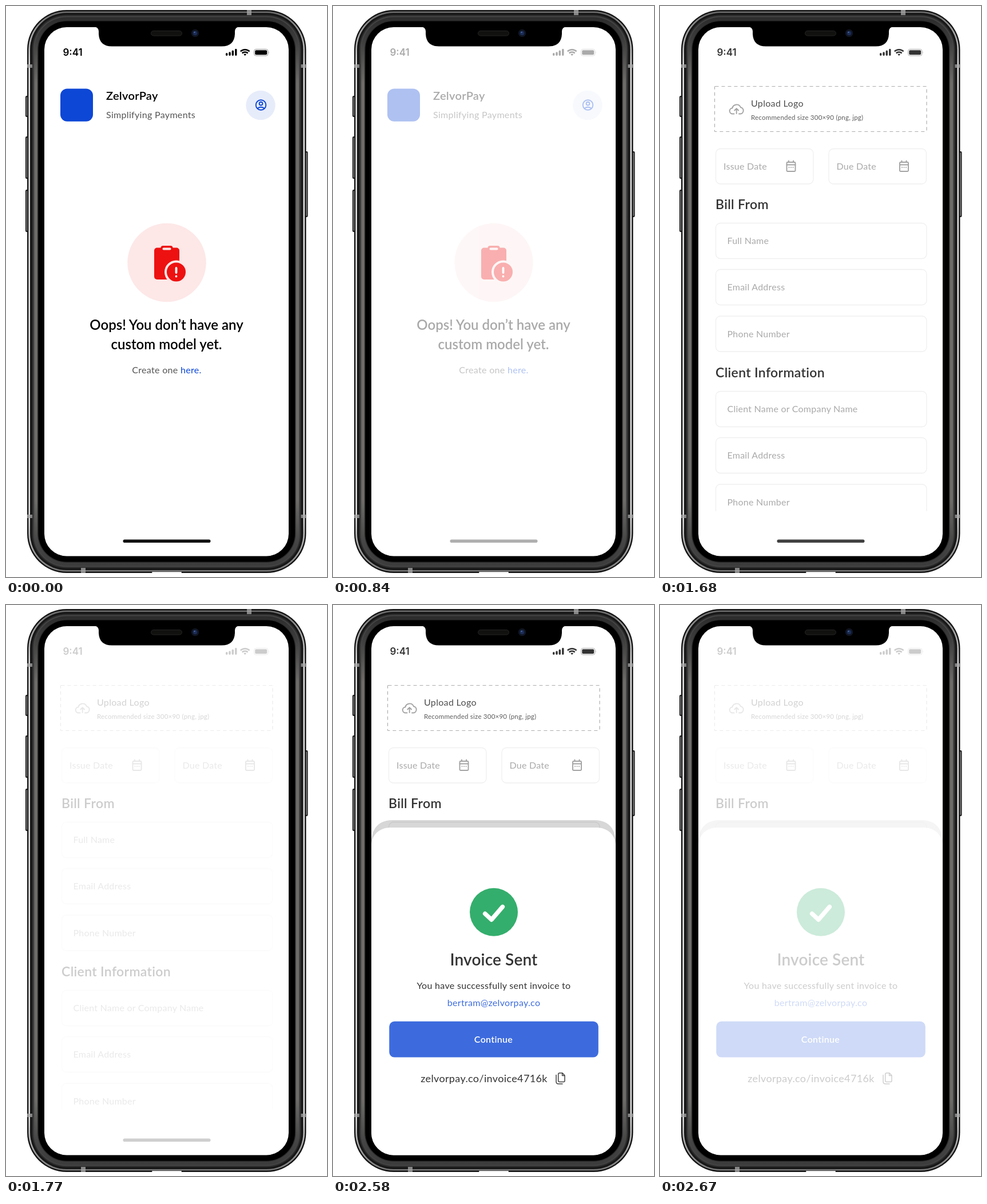
Recreate the animation shown at these times as an HTML page. Size 561 px wide and 998 px high, loop 2700 ms.

```html
<!DOCTYPE html>
<html lang="en">
<head>
<meta charset="utf-8">
<title>Invoice flow</title>
<style>
  html, body { margin: 0; width: 100%; height: 100%; overflow: hidden; background: #fff; }
  svg { display: block; width: 100vw; height: 100vh; }
  text { font: 16px Lato, sans-serif; letter-spacing: .02em; }
  .bold { font-weight: 600; letter-spacing: 0; }
  .mid { text-anchor: middle; }
  .hint { fill: #959595; letter-spacing: .015em; }
  .link { fill: #0d47d6; }
  .box { fill: none; stroke: #ebebeb; stroke-width: 1.3; }
  .icon { fill: none; stroke: #8c8c8c; stroke-width: 1.9; stroke-linecap: round; stroke-linejoin: round; }
</style>
</head>
<body>
<svg viewBox="0 0 561 998">
  <defs>
    <linearGradient id="steel" x2="0" y2="1">
      <stop offset="0" stop-color="#2c2c2c"/>
      <stop offset=".04" stop-color="#3c3c3c"/>
      <stop offset=".12" stop-color="#6d6c69"/>
      <stop offset=".88" stop-color="#6d6c69"/>
      <stop offset=".96" stop-color="#444"/>
      <stop offset="1" stop-color="#3c3c3c"/>
    </linearGradient>
    <linearGradient id="silver" x2="0" y2="1">
      <stop offset="0" stop-color="#6a6a6a"/>
      <stop offset=".03" stop-color="#999"/>
      <stop offset=".1" stop-color="#e4e4e4"/>
      <stop offset=".9" stop-color="#e4e4e4"/>
      <stop offset=".97" stop-color="#999"/>
      <stop offset="1" stop-color="#777"/>
    </linearGradient>
    <clipPath id="glass"><rect x="67" y="37" width="427" height="924.5" rx="39"/></clipPath>
    <clipPath id="scroll"><rect x="67" y="100" width="428" height="783"/></clipPath>
    <g id="calendar" class="icon">
      <rect x="1" y="3" width="15" height="16" rx="1.5"/>
      <path d="M1 7.5H16M4.5 .5V3M12.5 .5V3"/>
      <path d="M5 12h.1M8.5 12h.1M12 12h.1"/>
    </g>
    <g id="status">
      <text x="99.5" y="87" style="font:600 17px Inter, sans-serif; letter-spacing:0">9:41</text>
      <path d="M385.7 83.8v1.4M391 82v3.2M396.3 79.2v6M401.8 76.5v8.7" stroke="#000" stroke-width="3.4" stroke-linecap="round"/>
      <g fill="none" stroke="#000" stroke-width="2.5">
        <path d="M409.8 79.4a11.4 11.4 0 0 1 15.8 0M412.7 82.5a7.2 7.2 0 0 1 10 0"/>
        <path d="M415.3 84.6a3.8 3.8 0 0 1 4.8 0L417.7 87z" fill="#000" stroke="none"/>
      </g>
      <rect x="433.5" y="75.5" width="24.5" height="11.5" rx="3.6" fill="none" stroke="#999"/>
      <rect x="435.2" y="77.2" width="21" height="8" rx="2"/>
      <path d="M459.5 79.3q1.6 2 0 4z" fill="#999"/>
    </g>
    <rect id="home" x="204.5" y="932.5" width="153" height="5.6" rx="2.8" fill="#111"/>
    <g id="form"></g>
  </defs>

  <g id="phone"></g>

  <g clip-path="url(#glass)">
    <g class="screen">
      <use href="#status"/>
      <rect x="95" y="144.5" width="57" height="57.3" rx="12" class="link"/>
      <text x="175" y="164" class="bold" style="font-size:20px;letter-spacing:.015em">ZelvorPay</text>
      <text x="175" y="196" fill="#555">Simplifying Payments</text>
      <circle cx="445" cy="173.5" r="25.7" fill="#e7ecfa"/>
      <g fill="none" stroke="#0d47d6" stroke-width="1.9">
        <circle cx="445.5" cy="173" r="8.8"/>
        <circle cx="445.5" cy="170.6" r="2.9"/>
        <path d="M439.3 179q6.2-4.4 12.4 0"/>
      </g>
      <circle cx="281" cy="448.5" r="68.7" fill="#fde7e7"/>
      <g fill="#ee1111">
        <rect x="259" y="422.5" width="44" height="55.5" rx="5"/>
        <rect x="270.5" y="419" width="21" height="10" rx="4"/>
        <rect x="273.5" y="422.6" width="15" height="4" rx="2" fill="#fde7e7"/>
        <circle cx="297.5" cy="465" r="18.5" stroke="#fde7e7" stroke-width="4"/>
        <path d="M297.5 458v8M297.5 472.4v.1" stroke="#fff" stroke-width="3.8" stroke-linecap="round"/>
      </g>
      <g class="mid">
        <text x="280.5" y="566" class="bold" style="font-size:24px">Oops! You don’t have any</text>
        <text x="280.5" y="600" class="bold" style="font-size:24px">custom model yet.</text>
        <text x="281" y="642" fill="#555">Create one <tspan class="link">here.</tspan></text>
      </g>
      <use href="#home"/>
    </g>

    <g class="screen">
      <use href="#status"/>
      <use href="#form"/>
      <use href="#home"/>
    </g>

    <g class="screen">
      <use href="#status"/>
      <use href="#form"/>
      <path d="M67 962V411C69 388 82 376 104 376H457C479 376 492 388 494 411V962z" opacity=".2"/>
      <path d="M67 962V418C69 400 82 389 101 389H460C479 389 492 400 494 418V962z" fill="#fff"/>
      <circle cx="281" cy="536.8" r="42" fill="#029a48"/>
      <path d="M265.7 539.5L277 550 296.3 527.5" fill="none" stroke="#fff" stroke-width="7.6" stroke-linecap="round" stroke-linejoin="round"/>
      <rect x="98.3" y="727.8" width="365.5" height="62.8" rx="9" class="link"/>
      <g class="mid">
        <text x="281" y="630" class="bold" style="font-size:28px;letter-spacing:.005em">Invoice Sent</text>
        <text x="281" y="671">You have successfully sent invoice to</text>
        <text x="281" y="700.5" class="link">bertram@zelvorpay.co</text>
        <text x="280.5" y="765" class="bold" fill="#fff" style="letter-spacing:.02em">Continue</text>
        <text x="264" y="834" style="font-size:18px;letter-spacing:.02em">zelvorpay.co/invoice4716k</text>
      </g>
      <g class="icon" style="stroke:#111;stroke-width:1.5">
        <path d="M396 818h5l4 4.2v9.3q0 2-2 2h-7q-2.3 0-2.3-2v-11.2q0-2.3 2.3-2.3zM400.6 818.3v4.2h4"/>
        <path d="M390 821.5v11.5q0 4 4 4h7"/>
      </g>
    </g>
  </g>

  <path d="M154 36q7.5 1 8 8v5Q163 70.5 185 70.5H377Q399 70.5 400 49V44Q400.5 37 408 36z"/>
  <rect x="253.5" y="43.5" width="54" height="8.5" rx="4.2" fill="#11110f" stroke="#242424"/>
  <circle cx="330.5" cy="47.5" r="6.8" fill="#101522"/>
  <circle cx="330.5" cy="47.5" r="3.8" fill="#1b2c55"/>
  <circle cx="329.5" cy="46" r="1.3" fill="#48649c"/>
</svg>
<script>
const $ = id => document.getElementById(id);
const rect = (x, y, w, h, rx, attrs) =>
  `<rect x="${x}" y="${y}" width="${w}" height="${h}" rx="${rx}" ${attrs}/>`;
const text = (x, y, s, attrs) => `<text x="${x}" y="${y}" ${attrs}>${s}</text>`;

// Phone body: buttons, then rounded rings from the outside in
const ring = ([d, fill]) =>
  rect(37 + d, 7 + d, 487.5 - 2 * d, 984 - 2 * d, 69 - d, `fill="${fill}"`);
const key = ([x, y, h]) =>
  rect(x, y, 6, h, 2, 'fill="#1c1c1c"') + rect(x + 2, y + 2, 2, h - 4, 1, 'fill="#bbb"');
const band = ([x, y, w, h]) => rect(x, y, w, h, 0, 'fill="#aaa" opacity=".75"');
$('phone').innerHTML =
  [[34, 157, 37], [34, 228, 74], [34, 321, 74], [521.5, 254, 115]].map(key).join('') +
  [[0, '#141414'], [2.4, 'url(#silver)'], [5, '#171717'], [8.5, '#2c2c2c'], [10.5, '#444'],
   [12.5, 'url(#steel)'], [18, '#2c2c2c'], [19.5, '#000']].map(ring).join('') +
  rect(67, 37, 427, 924.5, 39, 'fill="#fff"') +
  [[421, 7, 8, 9], [131, 982, 8, 9], [37, 102, 9, 6], [515.5, 102, 9, 6],
   [37, 889, 9, 6], [515.5, 889, 9, 6]].map(band).join('') +
  rect(255, 989, 52, 2, 1, 'fill="#eee"');

// Invoice form
const field = (y, label) =>
  rect(97.5, y, 368.5, 62, 8, 'class="box"') + text(117.5, y + 36.5, label, 'class="hint"');
const date = (x, label) =>
  rect(x, 249.5, 170.5, 61.5, 8, 'class="box"') + text(x + 13.5, 286, label, 'class="hint"') +
  `<use href="#calendar" x="${x + 123}" y="270"/>`;
const heading = (y, s) =>
  text(97, y, s, 'class="bold" style="font-size:23px;letter-spacing:.015em"');
$('form').innerHTML = `<g clip-path="url(#scroll)">` +
  rect(95.5, 140.5, 370.5, 79, 1, 'fill="none" stroke="#999" stroke-width="1.2" stroke-dasharray="6 5"') +
  `<g class="icon"><path d="M129.5 188.5h-2.5a5 5 0 0 1-.6-10a7.6 7.6 0 0 1 14.5-1.3a5.7 5.7 0 0 1-.4 11.3h-2.5"/>
   <path d="M133.7 188v-8M130.3 182.5l3.4-3.4 3.4 3.4"/></g>` +
  text(159, 176, 'Upload Logo', 'fill="#222"') +
  text(159, 198.5, 'Recommended size 300×90 (png, jpg)', 'fill="#333" style="font-size:11.5px"') +
  date(97.5, 'Issue Date') + date(295, 'Due Date') +
  heading(355, 'Bill From') +
  field(379.5, 'Full Name') + field(460.5, 'Email Address') + field(542, 'Phone Number') +
  heading(649, 'Client Information') +
  field(673.5, 'Client Name or Company Name') + field(754.5, 'Email Address') +
  field(836, 'Phone Number') + `</g>`;

// Each screen holds, fades to white in 30 ms steps, then cuts to the next
const STEP = 30, LOOP = 2700;
const screens = [...document.querySelectorAll('.screen')];
const times = [[0, 750, 900], [900, 1680, 1800], [1800, 2580, 2700]];

function draw(now) {
  const t = now % LOOP;
  times.forEach(([start, fade, end], i) => {
    const shown = t >= start && t < end;
    const steps = (end - fade) / STEP + 1;
    const done = t < fade ? 0 : Math.floor((t - fade) / STEP) + 1;
    screens[i].style.display = shown ? '' : 'none';
    screens[i].style.opacity = 1 - done / steps;
  });
  requestAnimationFrame(() => draw(performance.now()));
}
draw(0);
</script>
</body>
</html>
```
